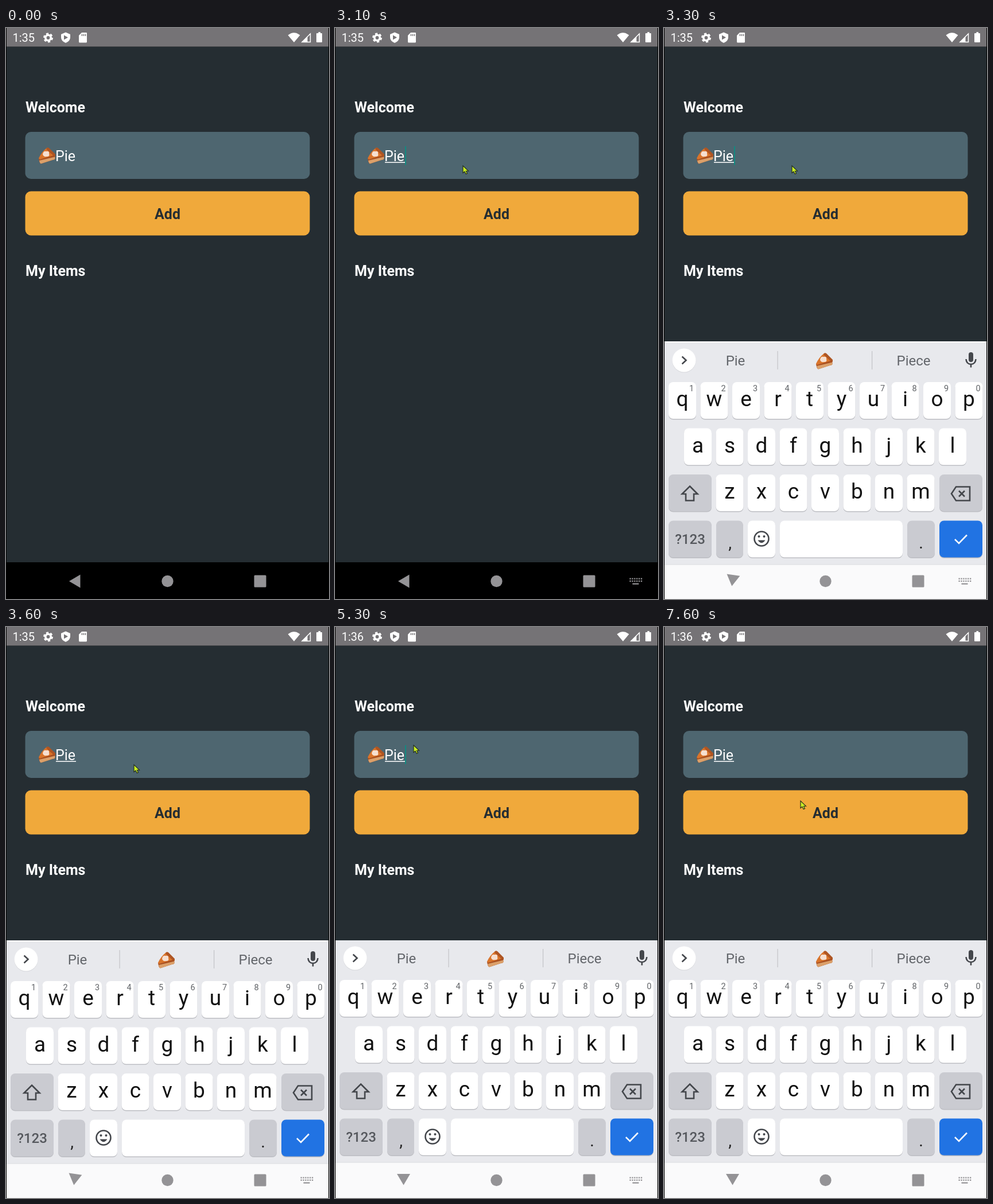
These frames come from a looping animation (563 by 995 pixels, 8000 ms). An HTML page:

```html
<!DOCTYPE html>
<html lang="en">
<head>
<meta charset="utf-8">
<title>Item list</title>
<style>
html, body { margin: 0; width: 100%; height: 100%; overflow: hidden; background: #000; }
svg { display: block; width: 563px; height: 995px; font-family: Roboto, sans-serif; }
.mid { text-anchor: middle; }
.bold { font-weight: 700; font-size: 25px; }
.line { fill: none; stroke: #44474c; stroke-width: 2.6; }
</style>
</head>
<body>
<svg id="stage" viewBox="0 0 563 995"></svg>
<script>
const LOOP = 8000, STEP = 100;
const FOCUS = 3100, SLIDE = 3200, SETTLE = 3800;

const rect = (x, y, w, h, fill, r = 0) =>
  `<rect x="${x}" y="${y}" width="${w}" height="${h}" rx="${r}" fill="${fill}"/>`;
const circle = (x, y, r, fill) => `<circle cx="${x}" cy="${y}" r="${r}" fill="${fill}"/>`;
const path = (d, attrs) => `<path d="${d}" ${attrs}/>`;
const label = (x, y, size, fill, str, attrs = 'class="mid"') =>
  `<text x="${x}" y="${y}" font-size="${size}" fill="${fill}" ${attrs}>${str}</text>`;

const pie = (x, y) => `<g transform="translate(${x} ${y})">
  ${path('M0 19L28 13L28.5 20Q27 22 24 22L4 28.5Q1 28 0 19Z', 'fill="#a84f20"')}
  ${path('M1 23L28.500 16.500V20Q27 22 24 22L4 28.500Q2 28 1 23Z', 'fill="#dba06a"')}
  ${path('M0 19Q5 8 14 1Q17 0 19 3L29 13L2 21Z', 'fill="#d9742b"')}
  ${path('M14 1Q17 -1 20 3L29 12V16L25 14L13 3Z', 'fill="#ae5523"')}
  ${path('M7 12Q8 6 13 7Q19 6 18 11Q20 16 14 16Q8 17 7 12Z', 'fill="#f6dfd0"')}
</g>`;

function statusBar() {
  const white = 'fill="#fff"';
  return rect(1, 0, 561, 32.5, '#757376') +
    label(11.5, 24, 20, '#fff', '', 'id="clock"') +
    `<g fill="none" stroke="#fff"><circle cx="73.500" cy="17" r="4.700" stroke-width="3.600"/>
     <circle cx="73.500" cy="17" r="7" stroke-width="3" stroke-dasharray="4 3.330"/></g>` +
    path('M104 7.500L112 11V16Q112 23 104 26Q96 23 96 16V11Z', white) +
    path('M101 12.500V20.500L108 16.500Z', 'fill="#757376"') +
    path('M132 8H140Q141 8 141 9V24Q141 25.500 139.500 25.500H128.500Q127 25.500 127 24V13Z', white) +
    path('M132.500 10.500V14M135.500 10.500V14M138.500 10.500V14', 'stroke="#757376" stroke-width="1.500"') +
    path('M502 25L491.500 12.500Q502 4 512.500 12.500Z', white) +
    path('M516 24.500H530.500V10Z', 'fill="none" stroke="#fff" stroke-width="1.500"') +
    path('M515 25H525.500V14.500Z', white) +
    path('M544.500 7H548V9H550Q551 9 551 10V24Q551 25 550 25H542Q541 25 541 24V10Q541 9 542 9H544.500Z', white);
}

function app() {
  return rect(1, 32.5, 561, 899, '#252d32') + statusBar() +
    label(34, 147, 25, '#fff', 'Welcome', 'class="bold"') +
    rect(33.5, 181, 496, 82, '#4e6670', 10) + pie(57, 208) +
    label(86, 231.5, 25, '#fff', 'Pie', '') +
    `<g id="underline">${rect(87, 233.5, 35, 1.5, '#fff')}</g>` +
    `<g id="caret">${rect(122, 206, 2, 33, '#138a80')}</g>` +
    rect(33.5, 284.5, 496, 77, '#f0a93b', 10) +
    label(281.5, 333, 25, '#252d32', 'Add', 'class="mid bold"') +
    label(34, 432, 25, '#fff', 'My Items', 'class="bold"');
}

const key = (x, y, w, fill = '#fff') =>
  rect(x, y + 1.5, w, 64, '#bdbec3', 8) + rect(x, y, w, 64, fill, 8);

function letterRow(letters, x, y, hints) {
  return [...letters].map((c, i) => {
    const mid = x + i * 55.5;
    return key(mid - 24, y, 48) + label(mid, y + 42, 37, '#111', c) +
      (hints ? label(mid + 16, y + 16, 14.5, '#606367', (i + 1) % 10) : '');
  }).join('');
}

function keyboard() {
  const gray = '#cacbd1', dark = '#44474c', soft = '#63666b';
  return rect(1, 546, 561, 387, '#e8e9ed') +
    rect(1, 933, 561, 70, '#fafafb') + rect(1, 932.5, 561, 1, '#dcdde0') +
    circle(35, 578, 20.5, '#d5d6da') + circle(35, 577, 20.5, '#fff') +
    path('M31.500 570.500L38.500 577L31.500 583.500', 'class="line"') +
    label(124.5, 586, 24, soft, 'Pie') + label(435, 586, 24, soft, 'Piece') +
    pie(265, 564) +
    rect(197.5, 561, 1.2, 32, '#c3c4c8') + rect(362, 561, 1.2, 32, '#c3c4c8') +
    rect(531, 563, 8, 17, dark, 4) +
    path('M526.500 575Q527 583.500 535 584Q543 583.500 543.500 575M535 584V589.500', 'class="line"') +
    letterRow('qwertyuiop', 32, 615, true) +
    letterRow('asdfghjkl', 59, 695.5) +
    letterRow('zxcvbnm', 114.5, 776) +
    key(8, 776, 75, gray) + key(480, 776, 75, gray) +
    path('M45 796.500L58.500 810H52V821.500H38V810H31.500Z', 'class="line"') +
    path('M509 797.500H533V821.500H509L501 809.500ZM514 804.500L524 814.500M524 804.500L514 814.500', 'class="line"') +
    key(8, 856.5, 75, gray) + label(45.5, 897, 24, '#55585d', '?123', 'class="mid" font-weight="500"') +
    key(91, 856.5, 47, gray) + label(115, 905, 29, '#222', ',') +
    key(146, 856.5, 48) + key(202, 856.5, 214) +
    key(424, 856.5, 48, gray) + label(448, 905, 29, '#222', '.') +
    key(480, 856.5, 75, '#2173e3') +
    '<circle cx="170" cy="888" r="12.500" class="line"/>' +
    circle(165.5, 884, 2, dark) + circle(174.5, 884, 2, dark) +
    path('M163.500 890.500Q170 900 176.500 890.500Z', `fill="${dark}"`) +
    path('M507 889L514 896L528 881.500', 'fill="none" stroke="#fff" stroke-width="2.600"');
}

function navIcons() {
  let dots = rect(518.5, 967.5, 11, 2.2, '#949396');
  for (let i = 0; i < 12; i++)
    dots += rect(513.5 + (i % 6) * 3.9, 958.5 + (i > 5) * 4.2, 2.3, 2.3, '#949396');
  return path('M108 953H131L119.500 972.500Z', 'id="back" fill="#949396"') +
    circle(281.5, 964, 10.2, '#949396') + rect(432.5, 953.5, 21, 21, '#949396', 1.5) +
    `<g id="imeIcon">${dots}</g>`;
}

document.getElementById('stage').innerHTML = app() +
  `<g id="ime">${rect(1, 546, 561, 449, '#fcfcfe')}<g id="keys">${keyboard()}</g></g>
  <rect id="navShade" x="0" y="931" width="563" height="64"/>
  <g id="nav">${navIcons()}</g>
  ${rect(0, 0, 1, 995, '#000')}${rect(562, 0, 1, 995, '#000')}
  <g id="mouse">${path('M0 0V12.500L3 10L5.200 14.500L7.500 13.500L5.500 9.200H9.500Z',
    'fill="#c9ee24" stroke="#1f2a1c" stroke-width="1.100"')}</g>`;

const el = id => document.getElementById(id);
const show = (id, on) => el(id).setAttribute('visibility', on ? 'visible' : 'hidden');
const set = (id, name, value) => el(id).setAttribute(name, value);

// Pointer path: time, x, y
const route = [[2900, 223, 240], [3600, 223, 240], [4200, 137, 206],
  [6100, 137, 206], [6500, 158, 255], [7100, 238, 303]];

function pointerAt(t) {
  const i = route.findIndex(p => p[0] > t);
  if (i < 1) return route.at(i).slice(1);
  const [a, b] = [route[i - 1], route[i]];
  const k = (t - a[0]) / (b[0] - a[0]);
  return [1, 2].map(n => a[n] + (b[n] - a[n]) * k);
}

function draw(now) {
  const t = Math.floor(now % LOOP / STEP) * STEP;
  const focused = t >= FOCUS, sliding = t === SLIDE, settled = t >= SETTLE;

  el('clock').textContent = settled ? '1:36' : '1:35';
  show('underline', focused);
  show('caret', focused && (t - FOCUS) % 1000 < 500 && t < 7600);
  show('ime', t >= SLIDE);
  show('imeIcon', focused);
  set('keys', 'transform', `translate(0 ${sliding ? 100 : settled ? 0 : 2})`);
  set('keys', 'opacity', sliding ? 0.85 : 1);
  set('navShade', 'opacity', t < SLIDE ? 1 : sliding ? 0.18 : 0);
  set('nav', 'opacity', sliding ? 0.65 : 1);
  set('back', 'transform', `rotate(${t <= SLIDE ? 90 : settled ? 0 : 8} 119 963.500)`);
  show('mouse', t >= route[0][0]);
  set('mouse', 'transform', `translate(${pointerAt(t)})`);
}

const start = performance.now();
(function tick() {
  draw(performance.now() - start);
  requestAnimationFrame(tick);
})();
</script>
</body>
</html>
```
